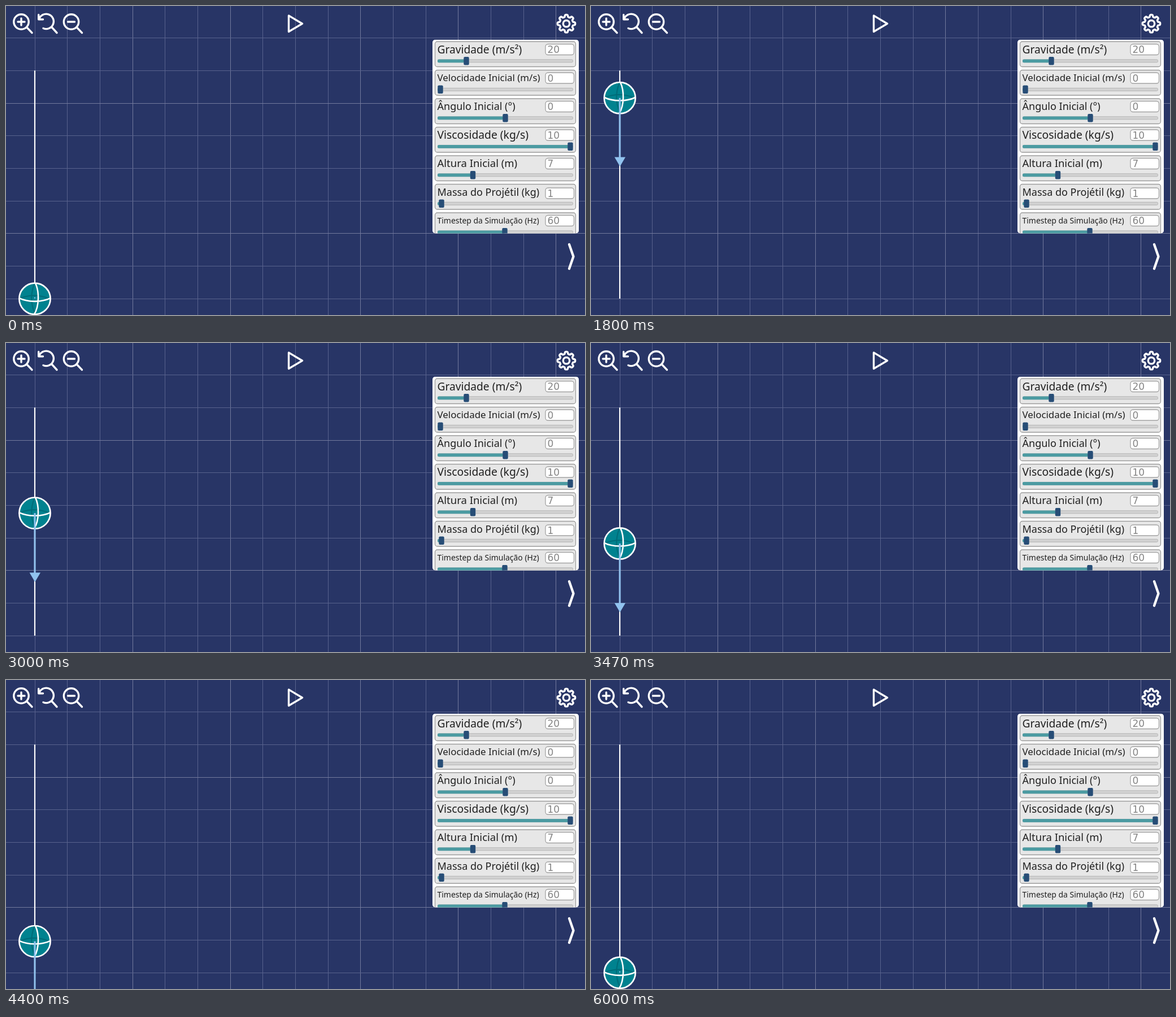
These frames come from a looping animation (1025x547 px, 6.8 s). An HTML page:

```html
<!DOCTYPE html>
<html lang="pt">
<head>
<meta charset="utf-8">
<title>Queda com viscosidade</title>
<style>
html, body { margin: 0; width: 100%; height: 100%; overflow: hidden; background: #283566; }
svg { display: block; width: 1025px; height: 547px; }
.icon { fill: none; stroke: #fff; stroke-width: 3.4; stroke-linecap: round; stroke-linejoin: round; }
.label { font-family: "Noto Sans", sans-serif; fill: #202020; }
.value { font: 17px "DejaVu Sans", sans-serif; fill: #858585; }
</style>
</head>
<body>
<svg viewBox="0 0 1025 547">
  <defs>
    <clipPath id="panelClip"><rect x="755" y="59.5" width="259" height="343" rx="5"/></clipPath>
  </defs>
  <g id="grid" shape-rendering="crispEdges"></g>
  <path d="M51 114.3V518" stroke="#fff" stroke-width="2.2"/>
  <g id="ball">
    <circle r="27.6" fill="#00828f" stroke="#fff" stroke-width="2.7"/>
    <g fill="none" stroke="#006b78" stroke-width="2">
      <path d="M-1 -26Q-11 0 0 26M-26 -1Q0 -11 26 0"/>
    </g>
    <path d="M1 -27.5C8 -13 8 13 -1 27.5M-27.5 -1C-13 6.5 13 6.5 27.5 -1" fill="none" stroke="#fff" stroke-width="2.6"/>
    <g id="arrow" fill="#91c3ef">
      <rect id="shaft" x="-1.5" width="3"/>
      <path id="head" d="M-9.7 -10H9.7L0 6.5Z"/>
    </g>
    <rect id="dot" x="-1" y="-2.5" width="2" height="2" fill="#91c3ef"/>
  </g>
  <g class="icon">
    <circle cx="27" cy="28" r="13.2"/>
    <path d="M36.5 37.5L46 47.5M21 28H33M27 22V34"/>
    <circle cx="115.5" cy="28" r="13.2"/>
    <path d="M125 37.5L134.5 47.5M109.5 28H121.5"/>
    <path d="M58.5 23.5A13.2 13.2 0 1 1 66 39.5M57.7 15.5V23.8H65.5M81 37.5L90 47.5"/>
    <path id="play" d="M500.5 17V45.5L524.5 31.2Z"/>
    <path id="gear"/>
    <circle cx="992" cy="31.2" r="5.7"/>
    <path d="M997 422L1004.5 443.5L997 465" stroke-width="4.3"/>
  </g>
  <g clip-path="url(#panelClip)">
    <rect x="755" y="59.5" width="259" height="343" fill="#fff"/>
    <g id="rows"></g>
  </g>
</svg>
<script>
const METRE = 57.68, ORIGIN_X = 51, GROUND = 518.2;
const HEIGHT = 7, GRAVITY = 20, DRAG = 10, MASS = 1;
const LOOP = 6800, STEP = 200 / 3, PRESS = 0.93, RELEASE = 1.282;
const $ = id => document.getElementById(id);

function drawGrid() {
  const strong = { x: [3, 6, 10, 13, 16], y: [2, 6] };
  const colour = bright => bright ? "#737a9d" : "#58628d";
  let lines = "";
  for (let i = 0; i <= 16; i++) {
    const x = Math.round(ORIGIN_X + i * METRE - 0.5);
    lines += `<rect x="${x}" y="0" width="1" height="547" fill="${colour(strong.x.includes(i))}"/>`;
  }
  for (let i = 0; i <= 8; i++) {
    const y = Math.round(GROUND - i * METRE - 0.5);
    lines += `<rect x="0" y="${y}" width="1025" height="1" fill="${colour(strong.y.includes(i))}"/>`;
  }
  $("grid").innerHTML = lines;
}

function drawGear() {
  const points = [];
  for (let i = 0; i < 160; i++) {
    const angle = i / 160 * 2 * Math.PI;
    const radius = 13.8 + 1.9 * Math.tanh(2.5 * Math.cos(8 * angle));
    points.push((992 + radius * Math.sin(angle)).toFixed(2) + " " + (31.2 - radius * Math.cos(angle)).toFixed(2));
  }
  $("gear").setAttribute("d", "M" + points.join("L") + "Z");
}

function drawRows() {
  // label, font size, value, slider handle x, input offset
  const rows = [
    ["Gravidade (m/s²)", 19.2, 20, 815, 0],
    ["Velocidade Inicial (m/s)", 16.9, 0, 769, 0],
    ["Ângulo Inicial (°)", 18, 0, 884, 0],
    ["Viscosidade (kg/s)", 19.3, 10, 999, 0],
    ["Altura Inicial (m)", 18.5, 7, 826.5, 0],
    ["Massa do Projétil (kg)", 18, 1, 771, 2],
    ["Timestep da Simulação (Hz)", 13.95, 60, 883, 0]
  ];
  $("rows").innerHTML = rows.map(([label, size, value, handle, shift], i) => `
    <g transform="translate(0 ${62.5 + i * 50.5})">
      <rect x="759.5" y="0.5" width="249" height="44.5" rx="4" fill="#e7e7e7" stroke="#9b9b9b" stroke-width="1.3"/>
      <text class="label" x="763.5" y="${14.5 + size * 0.35}" font-size="${size}">${label}</text>
      <rect x="955" y="${5 + shift}" width="50.5" height="19" rx="4.5" fill="#fff" stroke="#a3a3a3" stroke-width="1.3"/>
      <text class="value" x="958.5" y="${20.7 + shift}">${value}</text>
      <rect x="764.5" y="32.3" width="239" height="5" rx="2" fill="#d2d2d2" stroke="#b5b5b5"/>
      <rect x="764" y="32" width="${handle - 764}" height="5.8" rx="2" fill="#4b9ba2"/>
      <rect x="${handle - 4.7}" y="27.5" width="9.4" height="14.5" rx="2" fill="#274d76"/>
    </g>`).join("");
}

// Fall from rest under linear drag
function fall(seconds) {
  const tau = MASS / DRAG, terminal = GRAVITY * tau;
  const reached = 1 - Math.exp(-seconds / tau);
  return { distance: terminal * (seconds - tau * reached), speed: terminal * reached };
}

function drawAt(seconds) {
  const { distance, speed } = fall(Math.max(0, seconds - RELEASE));
  const falling = seconds >= RELEASE && distance < HEIGHT;
  const y = falling ? GROUND - (HEIGHT - distance) * METRE : GROUND;
  $("ball").setAttribute("transform", `translate(${ORIGIN_X} ${y})`);
  $("arrow").style.display = falling ? "" : "none";
  $("dot").style.display = falling ? "none" : "";
  const length = speed * METRE;
  $("shaft").setAttribute("height", length);
  $("head").setAttribute("transform", `translate(0.3 ${length}) scale(${Math.min(1, speed)})`);

  const press = (seconds - PRESS) / (RELEASE - PRESS);
  const scale = press > 0 && press < 1 ? 1 + 0.22 * Math.sin(press * Math.PI) : 1;
  $("play").setAttribute("transform", `translate(512 47) scale(${scale}) translate(-512 -47)`);
}

function tick() {
  const time = performance.now() % LOOP;
  drawAt(Math.floor((time + 4) / STEP) * STEP / 1000);
  requestAnimationFrame(tick);
}

drawGrid();
drawGear();
drawRows();
tick();
</script>
</body>
</html>
```
